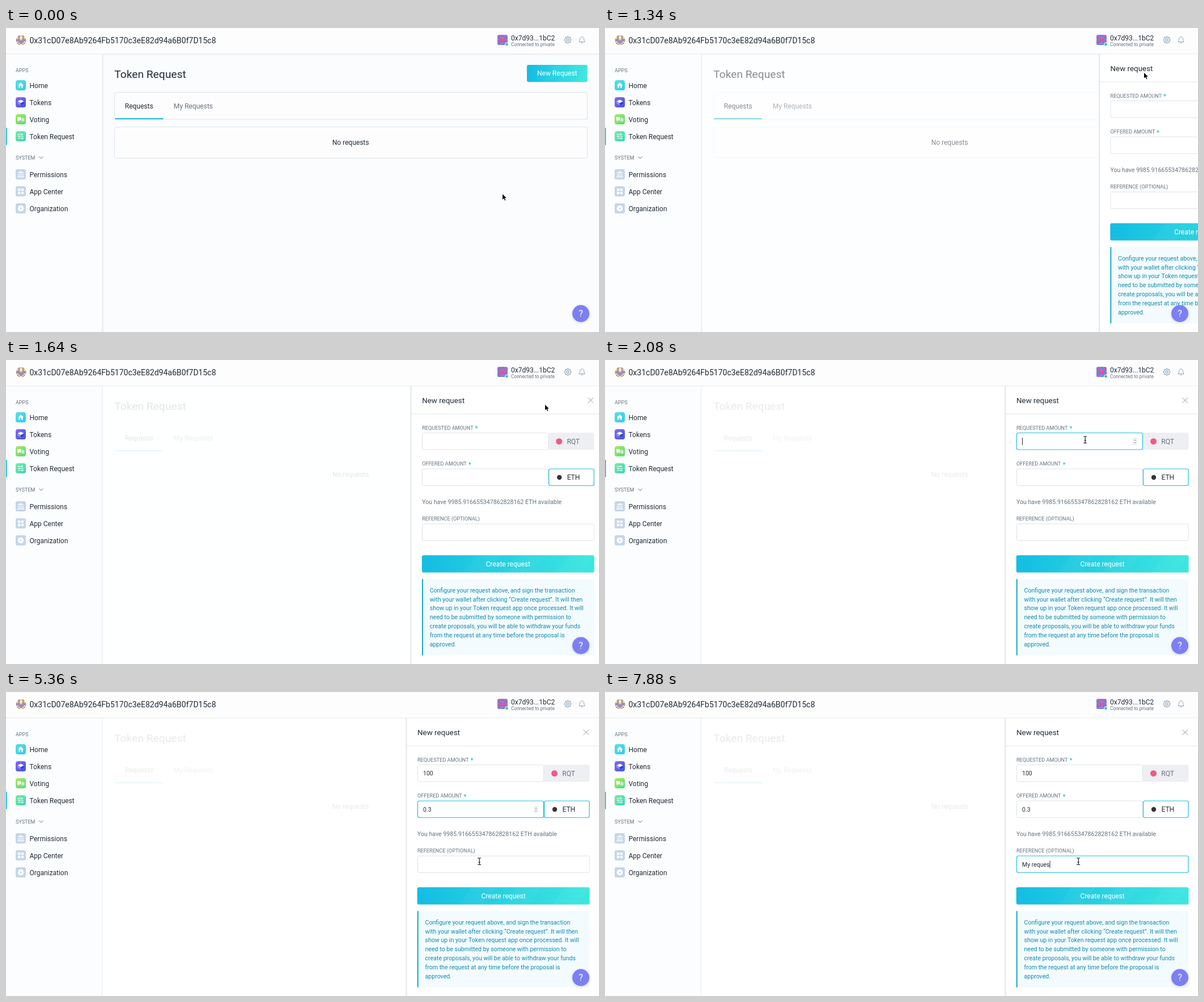
Recreate the animation shown at these times as an HTML page with a canvas. Size 1045 px wide and 536 px high, loop 8000 ms.

```html
<!DOCTYPE html>
<html lang="en">
<head>
<meta charset="utf-8">
<title>Token Request</title>
<style>
html, body { margin: 0; width: 100%; height: 100%; overflow: hidden; background: #fbfcfe; }
canvas { display: block; width: 1045px; height: 536px; }
</style>
</head>
<body>
<canvas id="stage"></canvas>
<script>
const W = 1045, H = 536, LOOP = 8000, STEP = 150;
const INK = '#212b36', MUTED = '#637381', LINE = '#dde3e9', ACCENT = '#1fbfe0';
const PANEL_X = 706, PANEL_W = 339;

const canvas = document.getElementById('stage');
const ctx = canvas.getContext('2d');
const dpr = window.devicePixelRatio || 1;
canvas.width = W * dpr;
canvas.height = H * dpr;

const clamp = v => Math.max(0, Math.min(1, v));
const ease = p => p * p * (3 - 2 * p);
const stepped = (t, start, n) => clamp((Math.floor((t - start) / STEP) + 1) / n);
const at = (t, keys) => keys.filter(k => k[0] <= t).pop()[1];

// --- timeline ---
const AMOUNT = [[0, ''], [2970, '1'], [3120, '100']];
const OFFER = [[0, ''], [3860, '0'], [4160, '0.'], [4460, '0.3']];
const REFERENCE = [[0, ''], [6250, 'M'], [6700, 'My'], [6850, 'My ']];
'reques'.split('').forEach((c, i) =>
  REFERENCE.push([7140 + i * 148, 'My ' + 'reques'.slice(0, i + 1)]));
const FOCUS = [[0, 0], [2080, 1], [3260, 2], [5500, 3]];
const CARET = [[0, true], [2670, false], [2970, true], [3710, false], [3860, true],
  [5060, false], [5500, true], [6100, false], [6250, true]];
const MOVES = [[300, 4, 75, -214], [1790, 2, -103.5, 63], [4910, 4, -12, 158]];

function pointer(t) {
  let x = 874.7, y = 292;
  for (const [start, n, dx, dy] of MOVES) {
    const p = ease(stepped(t, start, n));
    x += dx * p;
    y += dy * p;
  }
  return { x, y };
}

// Critically damped spring, sampled once per step
function slide(t) {
  if (t < 1340) return 0;
  if (t >= 2080) return 1;
  const d = 13 * (1340 + STEP * Math.floor((t - 1340) / STEP) - 1208) / 1000;
  return 1 - (1 + d) * Math.exp(-d);
}

// --- drawing helpers ---
function text(s, x, mid, size, color, align = 'left', weight = 400) {
  ctx.font = `${weight} ${size}px Roboto, sans-serif`;
  ctx.textAlign = align;
  ctx.fillStyle = color;
  ctx.fillText(s, x, mid + size * 0.36);
}

function rect(x, y, w, h, color) {
  ctx.fillStyle = color;
  ctx.fillRect(x, y, w, h);
}

function box(x, y, w, h, r, fill, stroke, lw = 1) {
  ctx.beginPath();
  ctx.roundRect(x, y, w, h, r);
  if (fill) { ctx.fillStyle = fill; ctx.fill(); }
  if (stroke) { ctx.strokeStyle = stroke; ctx.lineWidth = lw; ctx.stroke(); }
}

function disc(x, y, r, color) {
  ctx.beginPath();
  ctx.arc(x, y, r, 0, Math.PI * 2);
  ctx.fillStyle = color;
  ctx.fill();
}

function shape(d, x, y, fill, stroke, lw = 1) {
  const path = new Path2D(d);
  ctx.save();
  ctx.translate(x, y);
  if (fill) { ctx.fillStyle = fill; ctx.fill(path); }
  if (stroke) {
    ctx.strokeStyle = stroke;
    ctx.lineWidth = lw;
    ctx.lineCap = ctx.lineJoin = 'round';
    ctx.stroke(path);
  }
  ctx.restore();
}

function gradient(x0, y0, x1, y1, from, to) {
  const g = ctx.createLinearGradient(x0, y0, x1, y1);
  g.addColorStop(0, from);
  g.addColorStop(1, to);
  return g;
}

function button(label, x, y, w, h) {
  ctx.save();
  ctx.shadowColor = 'rgba(0,60,90,.12)';
  ctx.shadowBlur = 2;
  ctx.shadowOffsetY = 1;
  box(x, y, w, h, 3, gradient(x, y, x + w, y, '#14bde2', '#3de7df'));
  ctx.restore();
  ctx.save();
  ctx.clip();
  for (const f of [0.24, 0.5, 0.78])
    shape(`M0 ${h}L${h * 0.8} 0H${h * 0.8 + w * 0.14}L${w * 0.14} ${h}Z`, x + w * f, y, 'rgba(255,255,255,.03)');
  ctx.restore();
  text(label, x + w / 2, y + h / 2, 12, '#fff', 'center');
}

// Mirrored random pixels
function identicon(x, y, seed, [base, second, third], round) {
  const cell = 18 / 8;
  ctx.save();
  box(x, y, 18, 18, round ? 9 : 3, base);
  ctx.clip();
  for (let i = 0; i < 32; i++) {
    seed = (seed * 16807) % 2147483647;
    const k = seed % 6;
    if (k < 3) continue;
    const c = i % 4, r = Math.floor(i / 4);
    for (const col of [c, 7 - c])
      rect(x + col * cell, y + r * cell, cell + 0.1, cell + 0.1, k < 5 ? second : third);
  }
  ctx.restore();
}

function gear(x, y, r, color, lw) {
  let d = '';
  for (let i = 0; i <= 96; i++) {
    const a = i / 96 * Math.PI * 2;
    const q = r * (1 + 0.13 * Math.tanh(3 * Math.cos(8 * a)));
    d += `${i ? 'L' : 'M'}${(q * Math.cos(a)).toFixed(2)} ${(q * Math.sin(a)).toFixed(2)}`;
  }
  const hub = r * 0.4;
  d += `ZM${hub} 0A${hub} ${hub} 0 1 1 ${-hub} 0A${hub} ${hub} 0 1 1 ${hub} 0Z`;
  shape(d, x, y, null, color, lw);
}

// --- page parts ---
const APPS = [
  ['Home', 101, '#55e3e6', '#35c8ee', y =>
    shape('M-5 0L0 -5L5 0H3.6V4.5H1.3V1.3H-1.3V4.5H-3.6V0Z', 26, y, '#fff')],
  ['Tokens', 131, '#8a6af5', '#3d55e4', y => {
    shape('M-5.5 -1.2L0 1.7V5.2L-5.5 2.2Z', 26, y, '#8794f4');
    shape('M5.5 -1.2L0 1.7V5.2L5.5 2.2Z', 26, y, '#3a38bd');
    shape('M0 -4.5L5.5 -1.7L0 1.2L-5.5 -1.7Z', 26, y, '#fff');
  }],
  ['Voting', 161, '#a4ec5c', '#5cd584', y => {
    shape('M-6 -4H0L1 -1V2H-3L-4 4.5L-5 2H-6Z', 26, y, 'rgba(255,255,255,.9)');
    shape('M2 -2L3 -4L4 -2H6.5V4H1L0 3H2Z', 26, y, 'rgba(255,255,255,.6)');
  }],
  ['Token Request', 191, '#7beaa4', '#3cd4bb', y =>
    shape('M-5 -3.5H3M1.5 -5L3.3 -3.5L1.5 -2M5 0H-4M-2.5 -1.5L-4.3 0L-2.5 1.5M-4 3.5H4M2.5 2L4.5 3.5L2.5 5',
      26, y, null, '#fff', 0.9)],
];
const SYSTEM = [
  ['Permissions', 258, y => {
    shape('M-6 -2.5L0 -5.5L6 -2.5ZM-6 3.8H6V5.2H-6Z', 26, y, '#fff');
    shape('M-4 -1V3M-1.4 -1V3M1.4 -1V3M4 -1V3', 26, y, null, '#fff', 1.1);
  }],
  ['App Center', 288, y => {
    for (const dx of [-5, 0.8]) for (const dy of [-5, 0.8]) rect(26 + dx, y + dy, 4.2, 4.2, '#fff');
  }],
  ['Organization', 318, y => {
    disc(26, y, 4, '#fff');
    gear(26, y, 4.4, '#fff', 1.2);
    disc(26, y, 1.6, '#c5d6ea');
  }],
];

function sidebar() {
  rect(0, 46, 169, H - 46, '#fcfdfe');
  rect(169, 46, 1, H - 46, '#e8ebef');
  text('APPS', 17, 75, 9, MUTED);
  text('SYSTEM', 17, 229, 9, MUTED);
  shape('M-3.2 -1.6L0 1.6L3.2 -1.6', 62, 228.5, null, MUTED, 1);
  rect(0, 176, 1.6, 30.5, '#08bee5');
  for (const [name, y, from, to, glyph] of APPS) {
    box(17, y - 9, 18, 18, 4, gradient(17, y - 9, 35, y + 9, from, to));
    glyph(y);
    text(name, 41.5, y + 0.3, 12, INK);
  }
  for (const [name, y, glyph] of SYSTEM) {
    box(17, y - 9, 18, 18, 3, '#c5d6ea');
    glyph(y);
    text(name, 41.5, y + 0.3, 12, INK);
  }
}

function header() {
  rect(0, 0, W, 45, '#fdfdfe');
  rect(0, 45, W, 1, '#e6eaee');
  identicon(17.5, 12.5, 90217, ['#e6d76a', '#9a83c4', '#f3ecc0'], true);
  text('0x31cD07e8Ab9264Fb5170c3eE82d94a6B0f7D15c8', 41.5, 22, 14, INK);
  identicon(866, 12, 4471, ['#e0569f', '#4f8ee8', '#d06cc0'], false);
  disc(882.5, 28.8, 3.2, '#fff');
  disc(882.5, 28.8, 2.4, '#2ecc8f');
  text('0x7d93...1bC2', 890, 17.5, 12, INK);
  text('Connected to private', 890, 29, 8.35, MUTED);
  gear(990, 21, 5.3, '#8fa4b5', 1.1);
  shape('M-5 3.2C-3.3 1.7 -3.8 -.5 -3.4 -2.2C-3 -4.2 -1.6 -5.2 0 -5.2C1.6 -5.2 3 -4.2 3.4 -2.2C3.8 -.5 3.3 1.7 5 3.2ZM-1.4 5.2Q0 6.6 1.4 5.2',
    1015, 21, null, '#8fa4b5', 1);
}

function mainView(t, p) {
  rect(170, 46, W - 170, H - 46, '#fbfcfe');
  rect(170, 46, 2, H - 46, '#f0f2f5');
  rect(170, 46, W - 170, 2, '#f2f4f6');
  text('Token Request', 191, 81, 19.2, INK);
  button('New Request', 918, t >= 1190 && t < 1340 ? 66 : 65, 106.5, 30);
  ctx.globalAlpha = 1 - p;
  box(191.5, 113.5, 833, 47.5, 3, '#fdfdfe', LINE);
  box(191.5, 174.5, 833, 55, 3, '#fdfdfe', LINE);
  ctx.globalAlpha = 1;
  rect(192, 159, 85, 2, '#23b9d9');
  text('Requests', 209.5, 137.5, 12, INK);
  text('My Requests', 295.5, 137.5, 12, MUTED);
  text('No requests', 607.3, 201.8, 12, INK, 'center');
}

function field(x, y, w, value, focused, caret, spinner) {
  box(x + 0.5, y, w - 1, 29.5, 3, '#fff', focused ? ACCENT : LINE, focused ? 1.2 : 1);
  text(value, x + 10, y + 15, 10.5, INK);
  if (focused && caret) {
    const end = x + 10 + ctx.measureText(value).width;
    rect(end, y + 8.5, 1, 13, INK);
  }
  if (spinner) {
    box(x + 206, y + 9.5, 6, 11, 2.5, '#fbfbfb', '#cfd2d5', 0.8);
    shape('M-1.4 -1.4L0 -3.2L1.4 -1.4ZM-1.4 1.4L0 3.2L1.4 1.4Z', x + 209, y + 15, '#666');
  }
}

function label(s, x, y, required) {
  text(s, x, y, 9.15, MUTED);
  if (required) text('*', x + ctx.measureText(s).width + 3, y + 1, 11, ACCENT, 'left', 700);
}

const INFO = [
  'Configure your request above, and sign the transaction',
  'with your wallet after clicking “Create request”. It will then',
  'show up in your Token request app once processed. It will',
  'need to be submitted by someone with permission to',
  'create proposals, you will be able to withdraw your funds',
  'from the request at any time before the proposal is',
  'approved.',
];

function panel(t, p, hovered) {
  const left = PANEL_X + PANEL_W * (1 - p), x = left + 19;
  const focus = at(t, FOCUS), caret = at(t, CARET);
  rect(170, 46, W - 170, H - 46, `rgba(255,255,255,${0.9 * p})`);
  rect(left - 2, 46, 2, H - 46, '#eef0f2');
  rect(left, 46, PANEL_W, H - 46, '#fff');
  rect(left - 0.5, 46, 1, H - 46, '#dfe3e7');
  rect(left, 94.5, PANEL_W, 1, LINE);
  text('New request', x, 71.3, 13.4, INK);
  shape('M-4.5 -4.5L4.5 4.5M4.5 -4.5L-4.5 4.5', x + 297.3, 71, null, '#8797a6', 1);

  label('REQUESTED AMOUNT', x, 119.3, true);
  box(x + 223, 128.2, 80.5, 30, [0, 3, 3, 0], '#edeff3');
  field(x, 128.5, 223, at(t, AMOUNT), focus === 1, caret, focus === 1 || hovered === 1);
  disc(x + 241.5, 143.5, 5.5, '#ef5a86');
  text('RQT', x + 255.3, 143.5, 12, MUTED);

  label('OFFERED AMOUNT', x, 182.8, true);
  field(x, 192, 223, at(t, OFFER), focus === 2, caret, focus === 2 || hovered === 2);
  box(x + 223.5, 192, 79.5, 29.5, 3, '#fff', ACCENT, 1.2);
  disc(x + 242, 207, 4.2, '#343434');
  text('ETH', x + 255.5, 207, 12, INK);

  text('You have 9985.916655347862828162 ETH available', x, 249.8, 10.6, MUTED);
  label('REFERENCE (OPTIONAL)', x, 279.6, false);
  field(x, 289, 303.5, at(t, REFERENCE), focus === 3, caret, false);
  button('Create request', x - 0.2, 344.2, 303.7, 30.3);

  box(x - 0.2, 386.2, 303.7, 134.5, 2, '#f3fbfe');
  rect(x - 0.2, 386.2, 2, 134.5, '#12a9c8');
  INFO.forEach((s, i) => text(s, x + 13.5, 406 + i * 15.83, 10.6, '#118bab'));
}

function helpButton() {
  ctx.save();
  ctx.shadowColor = 'rgba(60,60,120,.25)';
  ctx.shadowBlur = 4;
  ctx.shadowOffsetY = 1;
  disc(1013, 503.5, 15, '#7c80f2');
  ctx.restore();
  text('?', 1013, 503.5, 16, '#fff', 'center');
}

function fieldUnder({ x, y }) {
  if (x < 725 || x > 1028) return 0;
  if (y > 289 && y < 319) return 3;
  if (x > 948) return 0;
  return y > 128 && y < 158 ? 1 : y > 192 && y < 222 ? 2 : 0;
}

function drawPointer({ x, y }, beam) {
  if (beam) {
    const d = 'M-2.5 -6Q0 -6 0 -4.5Q0 -6 2.5 -6M0 -5V5M-2.5 6Q0 6 0 4.5Q0 6 2.5 6M-1.3 1.5H1.3';
    shape(d, x, y - 0.5, null, '#fff', 2.6);
    shape(d, x, y - 0.5, null, '#111', 1.1);
  } else {
    shape('M0 0V11.2L2.6 8.8L4.3 12.8L6.2 12L4.5 8.1H7.8Z', x, y, '#000', '#fff', 1.2);
    shape('M0.3 1V10.4L2.7 8.2L4.5 12.3L5.7 11.8L3.9 7.7H7Z', x, y, '#000');
  }
}

function draw(t) {
  ctx.setTransform(dpr, 0, 0, dpr, 0, 0);
  const p = slide(t), spot = pointer(t);
  const hovered = p > 0.9 ? fieldUnder(spot) : 0;
  mainView(t, p);
  if (p > 0) panel(t, p, hovered);
  sidebar();
  header();
  helpButton();
  drawPointer(spot, hovered > 0);
}

const begin = performance.now();
function tick() {
  draw((performance.now() - begin) % LOOP);
  requestAnimationFrame(tick);
}
tick();
</script>
</body>
</html>
```
